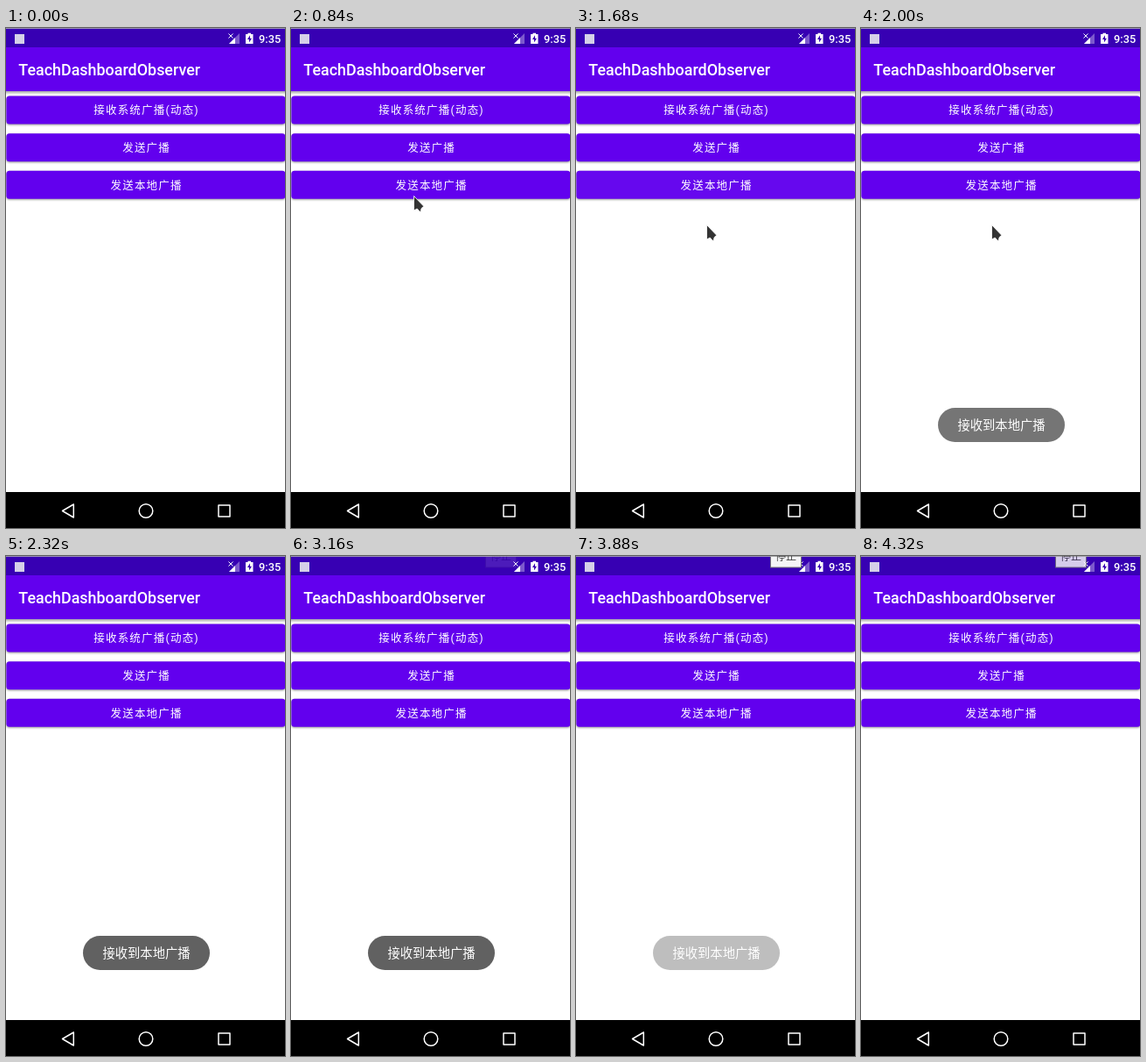
Recreate the animation shown at these times as an HTML page. Size 319x570 px, loop 4.4 s.

```html
<!DOCTYPE html>
<html lang="zh-CN">
<head>
<meta charset="utf-8">
<style>
html, body { margin: 0; height: 100%; overflow: hidden; background: #fff; }
svg { display: block; width: 319px; height: 570px; }
text { font-family: Roboto, "Noto Sans CJK SC", sans-serif; fill: #fff; }
.label { font-size: 12.5px; letter-spacing: 1.2px; text-anchor: middle; }
.bar { filter: drop-shadow(0 2px 1.5px rgba(0,0,0,.36)); }
.button { fill: #6200ee; filter: drop-shadow(0 1.2px 1px rgba(0,0,0,.42)); }
.raised { filter: drop-shadow(0 3px 3.5px rgba(0,0,0,.45)); }
</style>
</head>
<body>
<svg viewBox="0 0 319 570">
  <clipPath id="face"><rect x=".4" y="162.8" width="319" height="32" rx="3.5"/></clipPath>
  <rect class="bar" x="-9" y="10" width="340" height="62" fill="#6200ee"/>
  <rect width="319" height="22" fill="#3700b3"/>
  <rect width="319" height="1" fill="#9a90b4"/>
  <rect x="10" y="7" width="11" height="11" fill="#d5d0e8"/>
  <text x="14.3" y="54" font-size="17.9" font-weight="500">TeachDashboardObserver</text>

  <!-- status icons -->
  <path d="M255 18H267V6Z" fill="#fff" opacity=".35"/>
  <path d="M255 18H262V11Z" fill="#fff"/>
  <path d="M254.5 6.5l5 5m0-5l-5 5" stroke="#fff"/>
  <path d="M274 7h2.5V5.8h3.5V7h2.5V18H274Z" fill="#fff"/>
  <path d="M279 8.3l-3 4.7h2v3.5l3-4.8h-2Z" fill="#3700b3"/>
  <text x="289" y="16.7" font-size="12.8" font-weight="500">9:35</text>

  <g id="buttons"></g>
  <g id="press" clip-path="url(#face)" fill="#fff">
    <rect id="tint" y="162" width="320" height="34"/>
    <circle id="ripple" cx="144" cy="184"/>
  </g>
  <g id="labels"></g>

  <g id="toast">
    <rect x="88" y="433" width="145" height="39" rx="19.5" fill="#616161"/>
    <text x="160.5" y="457.8" font-size="14.3" text-anchor="middle">接收到本地广播</text>
  </g>

  <rect y="529" width="319" height="41"/>
  <g fill="none" stroke="#fff" stroke-width="1.5" stroke-linejoin="round">
    <path d="M64.5 550.5L77.3 543V558Z"/>
    <circle cx="160" cy="550.5" r="7.8"/>
    <rect x="243" y="544" width="13" height="13"/>
  </g>

  <g id="tip">
    <rect x="222.5" y="-9.5" width="35" height="22.5" fill="#f5f5f7" stroke="#777"/>
    <rect x="222" width="36" height="1" fill="#aaa"/>
    <text x="228" y="4.5" font-size="12" style="fill:#444">停止</text>
  </g>
  <path id="cursor" d="M.5 .5V17L4.2 15L8 19L9.2 14.5L11.8 12.3Z" fill="#333" stroke="#fff" stroke-width=".8"/>
</svg>
<script>
const LOOP = 4400, STEP = 40;
const $ = id => document.getElementById(id);
const set = (id, name, value) => $(id).setAttribute(name, value);

['接收系统广播(动态)', '发送广播', '发送本地广播'].forEach((label, i) => {
  const y = 77.5 + 42.67 * i;
  $('buttons').innerHTML += `<rect class="button" x=".4" y="${y}" width="319" height="32" rx="3.5"/>`;
  $('labels').innerHTML += `<text class="label" x="160.6" y="${y + 20.8}">${label}</text>`;
});

// Pointer path: time, x, y
const path = [[80, 212, 0], [280, 132, 242], [400, 132, 242], [600, 137, 201], [800, 137, 201],
  [840, 140, 191], [920, 144, 184], [1200, 144, 184], [1400, 149, 224], [2080, 149, 224], [2240, 205, 52]];

const ramp = (t, from, to) => Math.min(1, Math.max(0, (t - from) / (to - from)));
const ease = p => (1 - Math.cos(Math.PI * p)) / 2;

function pointer(t) {
  const i = Math.max(1, path.findIndex(key => key[0] >= t));
  const [t0, x0, y0] = path[i - 1], [t1, x1, y1] = path[i];
  const p = ramp(t, t0, t1);
  return [x0 + (x1 - x0) * p, y0 + (y1 - y0) * p];
}

function draw() {
  const t = Math.floor(performance.now() % LOOP / STEP) * STEP;

  const shown = t >= 80 && t <= 2240;
  set('cursor', 'visibility', shown ? 'visible' : 'hidden');
  if (shown) set('cursor', 'transform', `translate(${pointer(t)})`);

  const spread = ramp(t, 1040, 1480);
  set('ripple', 'r', 190 * spread);
  set('ripple', 'opacity', .06 * (spread > 0));
  set('tint', 'opacity', .065 * ramp(t, 1040, 1200));
  set('press', 'opacity', 1 - ramp(t, 1480, 1760));
  $('buttons').lastChild.classList.toggle('raised', t >= 1080 && t < 1680);

  set('toast', 'opacity', ease(ramp(t, 1720, 2086)) - ease(ramp(t, 3600, 4100)));
  set('tip', 'opacity', ramp(t, 3140, 3320) - ramp(t, 4300, 4420));
  requestAnimationFrame(draw);
}
draw();
</script>
</body>
</html>
```
